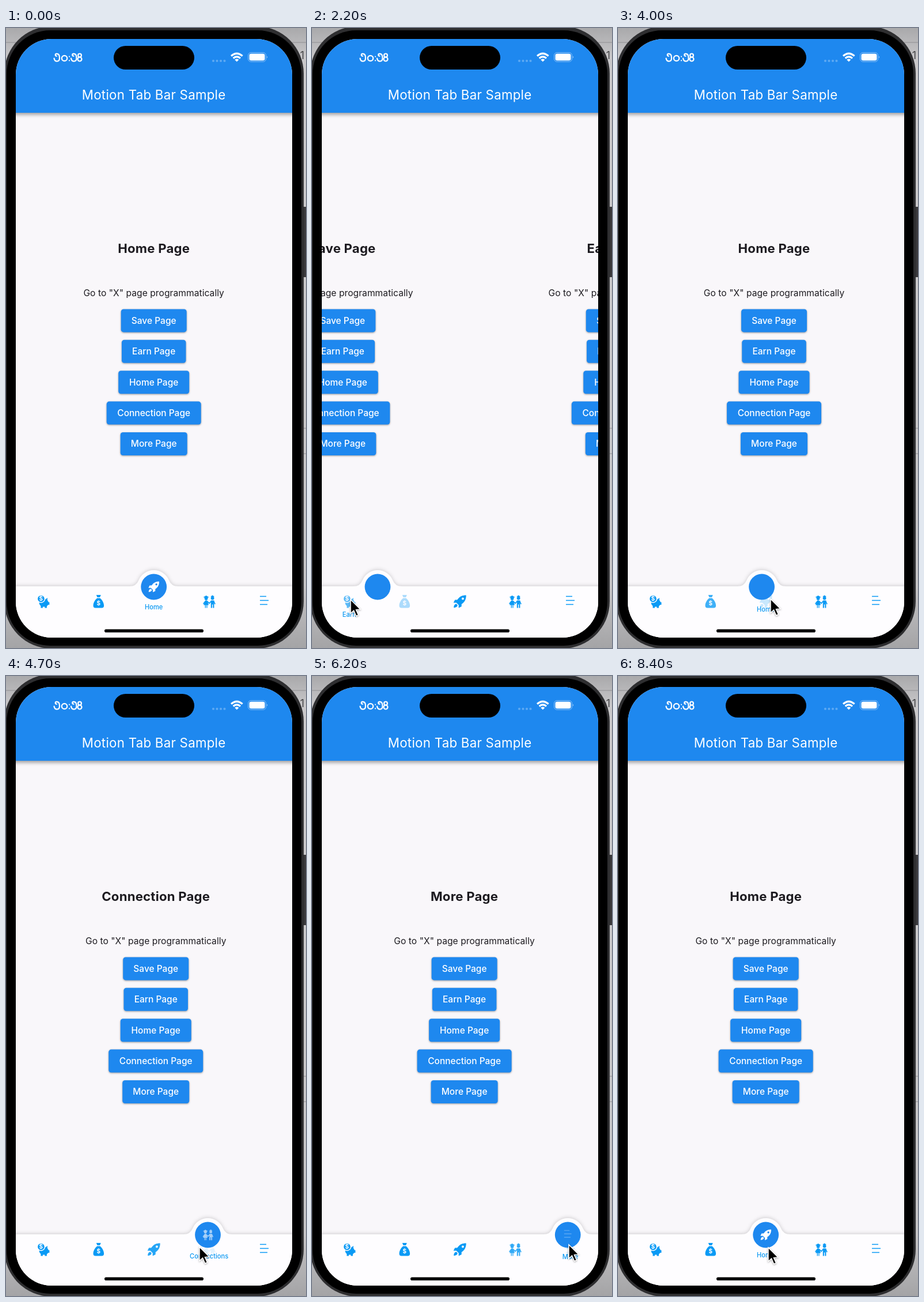
An HTML page for the animation above (8500 ms loop, 521x1075 px).

```html
<!DOCTYPE html>
<html lang="en">
<head>
<meta charset="utf-8">
<title>Motion Tab Bar Sample</title>
<style>
  html, body { margin: 0; width: 100%; height: 100%; overflow: hidden; background: #bdbcbe; }
  svg { display: block; width: 521px; height: 1075px; }
  text { font-family: Inter, Roboto, sans-serif; text-anchor: middle; }
  .title { font-size: 22.3px; letter-spacing: .25px; fill: #fff; }
  .head { font-size: 22.2px; font-weight: 700; letter-spacing: .2px; fill: #1d1b20; }
  .note { font-size: 15.6px; letter-spacing: .05px; fill: #1d1b20; }
  .btn rect { fill: #1e88ef; filter: drop-shadow(0 1.8px 1.6px rgba(0,0,0,.38)); }
  .btn text { font-size: 15.5px; font-weight: 500; fill: #fff; }
  .label { font-size: 11.1px; font-weight: 500; fill: #0a98f2; }
  .coin { font-size: 10px; font-weight: 700; }
  .bar { fill: #fefdff; filter: drop-shadow(0 -1px 3px rgba(0,0,0,.17)); }
</style>
</head>
<body>
<svg viewBox="0 0 521 1075">
  <defs>
    <clipPath id="screen"><rect x="17" y="19" width="480" height="1038" rx="62"/></clipPath>
    <linearGradient id="desk" x2="0" y2="1">
      <stop stop-color="#a9a9ab"/><stop offset=".05" stop-color="#c9c8ca"/>
      <stop offset=".9" stop-color="#c4c3c5"/><stop offset="1" stop-color="#a4a4a6"/>
    </linearGradient>
  </defs>

  <!-- desktop and phone body -->
  <rect width="521" height="1075" fill="url(#desk)"/>
  <path d="M0 25H521M515 694H521M515 738H521" stroke="#8f8e91"/>
  <text x="514.5" y="54" font-size="18" fill="#454547">1</text>
  <rect x="515" y="310" width="9" height="122" rx="2" fill="#39383b"/>
  <rect x="-3" y="-3" width="520" height="1079" rx="82" fill="#2e2e30"/>
  <rect x="1" y="4" width="512" height="1067" rx="76"/>

  <g clip-path="url(#screen)">
    <rect x="17" y="19" width="480" height="1038" fill="#f9f7fa"/>
    <g id="pages"></g>
    <rect x="10" y="10" width="494" height="137" fill="#1e88ef" style="filter:drop-shadow(0 3px 3px rgba(0,0,0,.38))"/>
    <text class="title" x="256.7" y="124">Motion Tab Bar Sample</text>
    <path id="bar" class="bar"/>
    <g id="tabs"></g>
    <g id="ball"><circle r="22.4" fill="#1e88ef"/><g id="ballIcons"></g></g>
    <rect x="171" y="1042.5" width="172" height="5.6" rx="2.8"/>
  </g>

  <!-- status bar -->
  <rect x="187" y="31" width="140" height="41" rx="20.5"/>
  <g fill="none" stroke="#fff" stroke-width="2.2" stroke-linecap="round">
    <path id="one" d="M83.5 52.5C84.5 59.500 93 59.500 93 52C93 46.500 90.500 44.700 88 44.700C85 44.700 85 49 88 48.700"/>
    <use href="#one" x="29.500"/>
    <circle cx="101.500" cy="52.500" r="4.700"/>
    <path d="M110 49.500V49.600M110 56.300V56.400"/>
    <ellipse cx="128" cy="47.500" rx="2.900" ry="3"/>
    <ellipse cx="128" cy="54" rx="3.500" ry="3.500"/>
  </g>
  <g fill="#fff" opacity=".28">
    <circle cx="360" cy="57" r="2.1"/><circle cx="366.500" cy="57" r="2.1"/>
    <circle cx="373" cy="57" r="2.1"/><circle cx="379.500" cy="57" r="2.1"/>
  </g>
  <g fill="none" stroke="#fff" stroke-width="3.200">
    <path d="M391 48.500Q400.800 40 410.600 48.500M394.700 52.500Q400.800 47 407 52.500"/>
    <path d="M397.200 55L400.800 58.500 404.400 55Q400.800 52 397.200 55Z" fill="#fff" stroke="none"/>
  </g>
  <rect x="420.500" y="42.500" width="31" height="16" rx="5" fill="none" stroke="#fff" stroke-opacity=".45"/>
  <rect x="422.500" y="44.500" width="27" height="12" rx="3.300" fill="#fff"/>
  <path d="M453 48.500Q455.500 50.500 453 52.500Z" fill="#fff" opacity=".5"/>

  <path id="cursor" d="M0 0V24L5.500 19 9.700 28.500 13.500 26.800 9.500 17.600 17 17Z" stroke="#fff" stroke-width="1.500"
    style="filter:drop-shadow(0 1px 1.500px rgba(0,0,0,.35))"/>
</svg>

<script>
const LOOP = 8500, TICK = 100, DURATION = 300;
const PAGE_WIDTH = 479.5, CENTER = 256.7, TAB_STEP = 95.9, BALL_Y = 969;
const PAGES = ["Save", "Earn", "Home", "Connection", "More"];
const LABELS = ["Earn", "Save", "Home", "Connections", "More"];
const BUTTON_WIDTHS = [114, 111.5, 123, 164, 116];

// [start time, tab]
const MOVES = [[-1000, 2], [1050, 1], [2100, 0], [3100, 1], [3766, 2],
  [4434, 3], [5950, 4], [6750, 3], [7740, 2]];
// [time, x, y]
const CURSOR = [[200, 526, 1016], [900, 160, 992], [1700, 160, 992], [2050, 67, 991],
  [2700, 67, 991], [3050, 139, 992], [3300, 139, 992], [3700, 265, 990], [4050, 265, 990],
  [4400, 336, 990], [4900, 336, 990], [5850, 446, 986], [6300, 446, 986],
  [6700, 352, 990], [7100, 352, 990], [7650, 261, 991], [8500, 261, 991]];

const $ = id => document.getElementById(id);
const clamp = v => Math.max(0, Math.min(1, v));
const tabX = i => CENTER + (i - 2) * TAB_STEP;
const cubic = (s, a, b) => 3 * s * (1 - s) ** 2 * a + 3 * s * s * (1 - s) * b + s ** 3;
const bezier = (x1, y1, x2, y2) => x => {
  let lo = 0, hi = 1;
  for (let i = 0; i < 24; i++) {
    const mid = (lo + hi) / 2;
    if (cubic(mid, x1, x2) < x) lo = mid; else hi = mid;
  }
  return cubic(hi, y1, y2);
};
const ease = bezier(.25, .1, .25, 1), easeOut = bezier(0, 0, .58, 1);

const ICONS = [
  (fg, bg) => `<path d="M-7 0Q-4-4 2-4H4L7-6.500 7-2.500 9 1H10.500V5.500H8.500L6 8V11H2.500V9H-1V11H-4.500V7.500Q-8 5-7 0Z"/>
    <circle cx="-4" cy="-4.800" r="6.500" stroke="${bg}" stroke-width="1.400"/>
    <text class="coin" x="-4" y="-1.200" fill="${bg}">$</text>`,
  (fg, bg) => `<path d="M-4-11.500H4L2.300-7.500H-2.300ZM-2.500-6H2.500C6-3 9.300 2 9.300 7Q9.300 11 5.500 11H-5.500Q-9.300 11-9.300 7C-9.300 2-6-3-2.500-6Z"/>
    <text class="coin" y="6.600" fill="${bg}">$</text>`,
  () => `<path fill-rule="evenodd" d="M11-11C3-11-1-8-4.500-3H-8.500L-11 2H-6L-2 6V11L3 8.500V4.500C8 1 11-3 11-11ZM7.200-5a2 2 0 1 0-4 0 2 2 0 0 0 4 0Z"/>
    <path d="M-6 4C-9 4-10.500 7-10.500 10.500-7 10.500-4 9-4 6Z"/>`,
  fg => `<circle cx="-5" cy="-5.500" r="2.900"/><circle cx="6" cy="-6" r="2.900"/>
    <path d="M-10-7.500L-5-10.500 0-7.500-5-6ZM2.500-8.500L6-11 9.500-8.500ZM-6.500-2H-3.500L-.5 6H-3V11H-4.400V6H-5.600V11H-7V6H-9.500ZM3.200-2H8.800V11H6.700V5H5.300V11H3.200Z"/>
    <path d="M-6-1L-10 4M-4-1L.5 3 4-1M8-1L10.500 4.500" fill="none" stroke="${fg}" stroke-width="1.700"/>`,
  fg => `<path d="M-7.500-9H3.500M-7.500-2H7.500M-7.500 5H5.500" stroke="${fg}" stroke-width="1.700"/>`
];
const icon = (i, fg, bg) => `<g fill="${fg}">${ICONS[i](fg, bg)}</g>`;

const button = (name, i) => {
  const w = BUTTON_WIDTHS[i], y = 507.4 + i * 53.4;
  return `<g class="btn"><rect x="${CENTER - w / 2}" y="${y - 20}" width="${w}" height="40" rx="4.500"/>
    <text x="${CENTER}" y="${y + 5.3}">${name} Page</text></g>`;
};
const buttons = PAGES.map(button).join("");
$("pages").innerHTML = PAGES.map(name => `<g>
  <text class="head" x="${CENTER}" y="389.500">${name} Page</text>
  <text class="note" x="${CENTER}" y="465">Go to "X" page programmatically</text>${buttons}</g>`).join("");
$("tabs").innerHTML = LABELS.map((label, i) => `<g transform="translate(${tabX(i)} 0)">
  <g transform="translate(0 994.500)">${icon(i, "#0a9af5", "#fefdff")}</g>
  <text class="label">${label}</text></g>`).join("");
$("ballIcons").innerHTML = LABELS.map((_, i) =>
  `<g transform="scale(.85)">${icon(i, "#fff", "#1e88ef")}</g>`).join("");

const pages = [...$("pages").children];
const tabs = [...$("tabs").children];
const ballIcons = [...$("ballIcons").children];
const move = (el, x, y) => el.setAttribute("transform", `translate(${x} ${y})`);

function drawCursor(t) {
  const next = CURSOR.findIndex(k => k[0] > t);
  $("cursor").style.display = next > 0 ? "" : "none";
  if (next < 1) return;
  const [t0, x0, y0] = CURSOR[next - 1], [t1, x1, y1] = CURSOR[next];
  const u = (t - t0) / (t1 - t0), k = u * u * (3 - 2 * u);
  move($("cursor"), x0 + (x1 - x0) * k, y0 + (y1 - y0) * k);
}

function draw(t) {
  const at = MOVES.findLastIndex(m => m[0] <= t);
  const [start, to] = MOVES[at], from = at ? MOVES[at - 1][1] : to;
  const p = clamp((t - start) / DURATION);
  const page = from + (to - from) * ease(p);
  const x = tabX(from + (to - from) * easeOut(p));

  pages.forEach((el, i) => move(el, (i - page) * PAGE_WIDTH, 0));
  tabs.forEach((el, i) => {
    const [glyph, label] = el.children;
    glyph.setAttribute("opacity", i === to ? 1 - p : i === from ? p : 1);
    label.setAttribute("y", 1028 - 20 * p);
    label.style.display = i === to ? "" : "none";
  });
  ballIcons.forEach((el, i) => {
    const shown = i === to ? easeOut(clamp((p - .8) / .2)) : i === from ? 1 - clamp(p / .2) : 0;
    el.setAttribute("opacity", shown);
  });
  move($("ball"), x, BALL_Y);
  $("bar").setAttribute("d", `M0 968H${x - 42}Q${x - 30.5} 968 ${x - 26.5} 958
    A28.500 28.500 0 0 1 ${x + 26.5} 958Q${x + 30.5} 968 ${x + 42} 968H521V1075H0Z`);
  drawCursor(t);
}

function frame() {
  const t = performance.now() % LOOP;
  draw(Math.floor(t / TICK) * TICK);
  requestAnimationFrame(frame);
}
frame();
</script>
</body>
</html>
```
